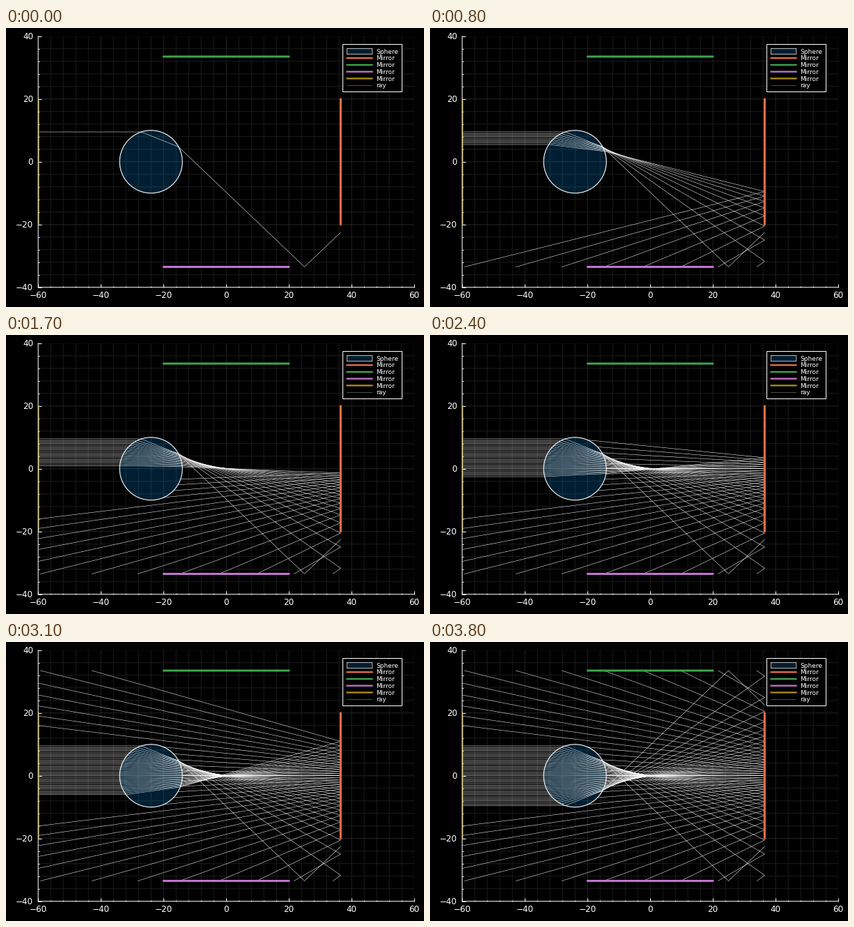
A matplotlib script for the animation above (3900 ms loop, 600 by 400 pixels).

```python
import math

import matplotlib.pyplot as plt
import numpy as np
from matplotlib.animation import FuncAnimation
from matplotlib.patches import Circle, Rectangle
from matplotlib.ticker import MultipleLocator

W, H, DPI = 600, 400, 100
PX = 72 / DPI                          # one pixel in points
LEFT, TOP, SCALE = 46.15, 11.75, 4.5   # plot area in pixels

CENTER, RADIUS, INDEX = np.array([-24.0, 0.0]), 10.0, 1.24
HITS = 4
WALLS = [(0, 36.5), (1, 33.5), (1, -33.5), (0, -60.0)]  # axis, position
COLORS = ["#e26f46", "#3da44d", "#c371d2", "#ac8d18"]
BLUE = (0, 0.604, 0.98, 0.2)
EPS = 1e-6

plt.rcParams["font.family"] = "DejaVu Sans"
plt.rcParams["path.snap"] = False


def next_hit(p, d):
    """Distance to the nearest surface and its wall axis (None for the sphere)."""
    found = []
    for axis, pos in WALLS:
        if abs(d[axis]) > EPS:
            found.append(((pos - p[axis]) / d[axis], axis))
    rel = p - CENTER
    b = rel @ d
    disc = b * b - rel @ rel + RADIUS ** 2
    if disc > 0:
        root = math.sqrt(disc)
        found += [(-b - root, None), (-b + root, None)]
    return min((f for f in found if f[0] > EPS), key=lambda f: f[0])


def refract(p, d):
    normal = (p - CENTER) / RADIUS
    ratio = 1 / INDEX
    if d @ normal > 0:
        normal, ratio = -normal, INDEX
    c = -(d @ normal)
    k = math.sqrt(1 - ratio ** 2 * (1 - c * c))
    return ratio * d + (ratio * c - k) * normal


def trace(y):
    p, d = np.array([-60.0, y]), np.array([1.0, 0.0])
    path = [p]
    for _ in range(HITS):
        t, axis = next_hit(p, d)
        p = p + t * d
        path.append(p)
        if axis is None:
            d = refract(p, d)
        else:
            d = d.copy()
            d[axis] *= -1
    return np.array(path)


fig = plt.figure(figsize=(W / DPI, H / DPI), dpi=DPI, facecolor="black")
ax = fig.add_axes([LEFT / W, 1 - (TOP + 80 * SCALE) / H,
                   120 * SCALE / W, 80 * SCALE / H], facecolor="black")
ax.set(xlim=(-60, 60), ylim=(-40, 40))
ax.set_axisbelow(True)
for axis in (ax.xaxis, ax.yaxis):
    axis.set_major_locator(MultipleLocator(20))
    axis.set_minor_locator(MultipleLocator(4))
ax.tick_params(which="both", direction="in", color="white", width=PX,
               labelbottom=False, labelleft=False)
ax.tick_params(which="major", length=5 * PX)
ax.tick_params(which="minor", length=2.5 * PX)
ax.grid(which="major", color="#242424", lw=PX)
ax.grid(which="minor", color="#1c1c1c", lw=PX)
for side in ("top", "right"):
    ax.spines[side].set_visible(False)
for side in ("left", "bottom"):
    ax.spines[side].set(color="white", linewidth=PX)

ax.add_patch(Circle(CENTER, RADIUS, fc=BLUE, ec="white", lw=1.1 * PX, zorder=2))
for (axis, pos), color in zip(WALLS, COLORS):
    span = (-20, 20)
    xs, ys = ((pos, pos), span) if axis == 0 else (span, (pos, pos))
    ax.plot(xs, ys, color=color, lw=3 * PX, solid_capstyle="round", zorder=2.45)

heights = np.linspace(9.5, -9.5, 39)
rays = [ax.plot(*trace(y).T, color="white", lw=0.5 * PX, zorder=2.4)[0]
        for y in heights]

# Labels and legend, placed in pixels
top = fig.add_axes([0, 0, 1, 1], xlim=(0, W), ylim=(H, 0))
top.axis("off")


def label(x, y, text, size, ha):
    top.text(x, y, text, color="white", fontsize=size * PX, ha=ha, va="baseline")


def tick_text(v):
    return str(v).replace("-", "\u2212")


for v in range(-60, 61, 20):
    label(LEFT + (v + 60) * SCALE, 387.4, tick_text(v), 12, "center")
for v in range(-40, 41, 20):
    label(39, TOP + (40 - v) * SCALE + 4.3, tick_text(v), 12, "right")

top.add_patch(Rectangle((483.5, 23.5), 85, 68, fc="black", ec="white", lw=PX))
top.add_patch(Rectangle((489.3, 29.5), 36.5, 8, fc=BLUE, ec="white", lw=0.7 * PX))
names = ["Sphere"] + ["Mirror"] * 4 + ["ray"]
for i, name in enumerate(names):
    y = 33.4 + 9.75 * i
    label(531, y + 3.2, name, 9, "left")
    if i > 0:
        color, width = (COLORS + ["white"])[i - 1], 2.3 if i < 5 else 0.3
        top.plot((489.3, 525.8), (y, y), color=color, lw=width * PX,
                 solid_capstyle="round")


def update(frame):
    for i, ray in enumerate(rays):
        ray.set_visible(i <= frame)
    return rays


anim = FuncAnimation(fig, update, frames=len(rays), interval=100, repeat=True)
plt.show()
```
